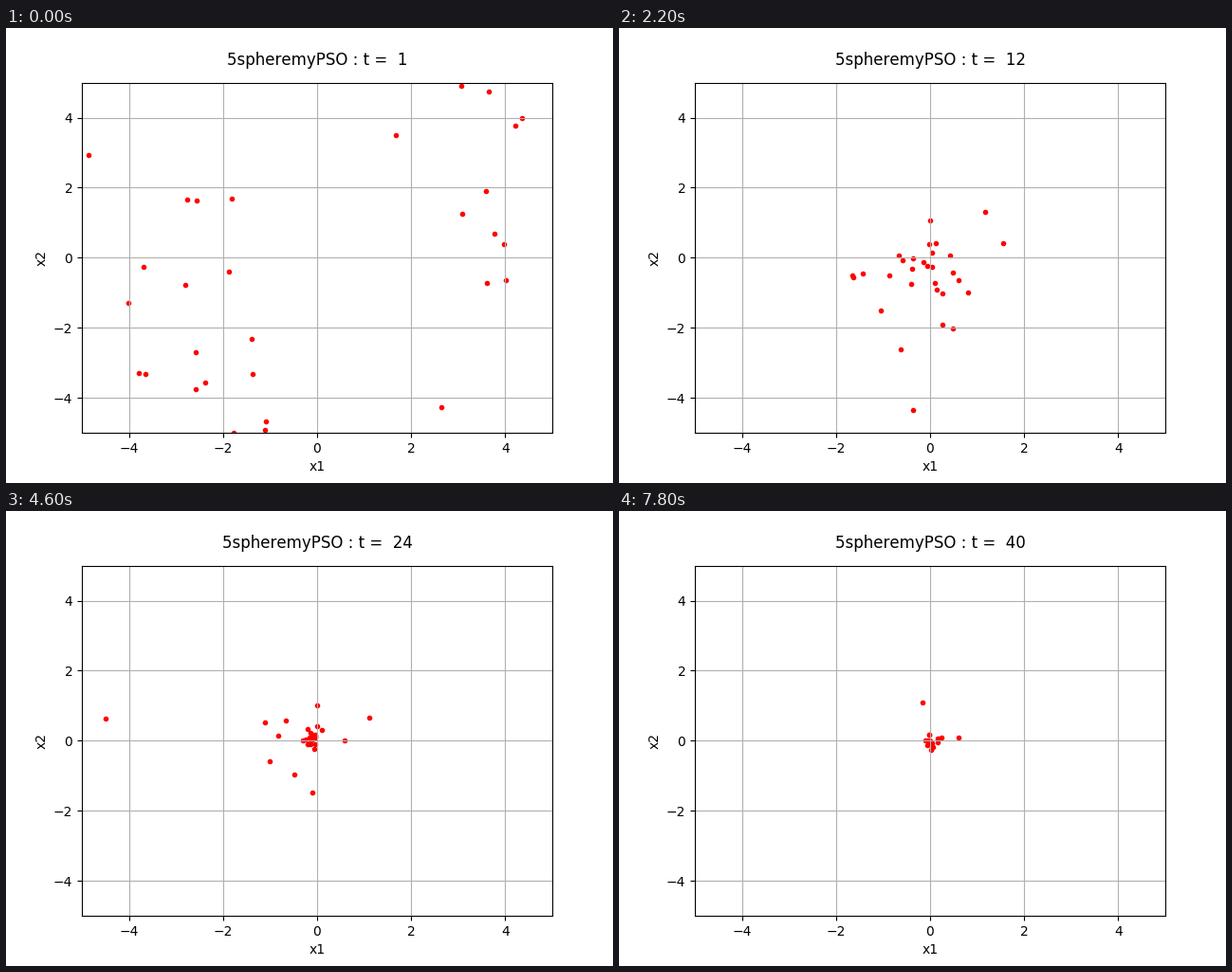
Recreate the animation shown at these times as a matplotlib script. Size 640x480 px, loop 8000 ms.

```python
import numpy as np
import matplotlib.pyplot as plt
from matplotlib.animation import FuncAnimation

STEPS = 40
STEP_MS = 200
DIMS = 5
INERTIA, PULL = 0.7, 1.5
plt.rcParams["text.kerning_factor"] = 6


def scatter_box(rng, count, low, high):
    return rng.uniform(low, high, (count, 2))


def start_points(rng):
    """Visible pair of coordinates: three loose groups and three strays."""
    return np.vstack([
        scatter_box(rng, 10, (3.0, -1.0), (4.5, 4.9)),
        scatter_box(rng, 14, (-4.6, -5.0), (-0.6, 0.3)),
        scatter_box(rng, 3, (-2.8, 1.3), (-0.1, 1.7)),
        [(-4.85, 2.93), (1.67, 3.50), (2.64, -4.26)],
    ])


def sphere(x):
    return (x ** 2).sum(axis=1)


def run_swarm(seed):
    """Particle swarm on the sphere function; returns the first two axes."""
    rng = np.random.default_rng(seed)
    xy = start_points(rng)
    pos = np.hstack([xy, rng.uniform(-5, 5, (len(xy), DIMS - 2))])
    vel = np.zeros_like(pos)
    best = pos.copy()
    path = [xy]
    for _ in range(STEPS - 1):
        leader = best[sphere(best).argmin()]
        r1, r2 = rng.random((2, *pos.shape))
        vel = (INERTIA * vel + PULL * r1 * (best - pos)
               + PULL * r2 * (leader - pos))
        pos = pos + vel
        better = sphere(pos) < sphere(best)
        best[better] = pos[better]
        path.append(pos[:, :2])
    return path


path = run_swarm(seed=5)

fig, ax = plt.subplots(figsize=(6.4, 4.8), dpi=100)
ax.set(xlim=(-5, 5), ylim=(-5, 5), xlabel="x1", ylabel="x2")
ax.grid(True)
dots = ax.scatter(*path[0].T, c="red", marker=".", s=36)
title = ax.text(0.5, 1.05, "", transform=ax.transAxes, ha="center", size="large")


def update(i):
    dots.set_offsets(path[i])
    title.set_text(f"5spheremyPSO : t =  {i + 1}")
    return dots, title


anim = FuncAnimation(fig, update, frames=STEPS, interval=STEP_MS,
                     repeat=True, repeat_delay=0)
plt.show()
```
